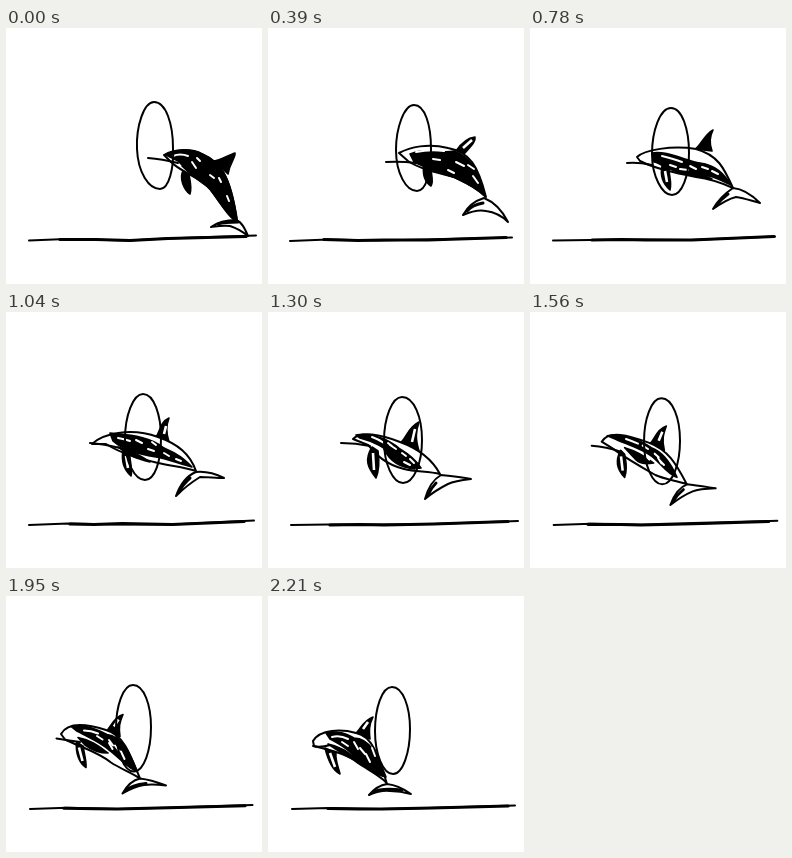
An HTML page without scripts that plays this animation: 256 by 256 pixels, repeating every 2340 ms.

```html
<!DOCTYPE html>
<html lang="en">
<head>
<meta charset="utf-8">
<title>Dolphin through a hoop</title>
<style>
html, body { margin: 0; width: 100%; height: 100%; overflow: hidden; background: #fff; }
svg { display: block; width: 100%; height: 100%; }
path {
  fill: none; stroke: #000; stroke-width: 2;
  stroke-linecap: round; stroke-linejoin: round;
  animation: swim 2340ms infinite;
}
.ink { fill: #000; stroke-width: 1.6; }
.skin { fill: #fff; }
.chalk { stroke: #fff; }

/* Seven poses, a to g; steps hold each drawing for 130 ms. */
@keyframes swim {
  0% { d: var(--a); animation-timing-function: steps(3); }
  16.6667% { d: var(--b); animation-timing-function: steps(3); }
  33.3333% { d: var(--c); animation-timing-function: steps(2); }
  44.4444% { d: var(--d); animation-timing-function: steps(2); }
  55.5556% { d: var(--e); animation-timing-function: steps(3); }
  72.2222% { d: var(--f); animation-timing-function: steps(4); }
  94.4444% { d: var(--g); animation-timing-function: steps(1); }
  100% { d: var(--g); }
}

#line {
  --a: path("M23 212.5L60 211L122 212.5L160 210.5L250 207.5");
  --b: path("M22 213L60 211.5L110 212.5L160 211.5L244 209.5");
  --c: path("M23 212.5L60 212L112 211.5L160 212L245 208.5");
  --d: path("M23 213L62 211.5L110 212.5L165 212.5L248 208.5");
  --e: path("M23 213L60 212.5L114 212.5L165 212L250 209");
  --f: path("M24 213L62 211.5L112 213L160 211.5L246 208.5");
  --g: path("M24 213L60 212L112 213L160 212L247 209.5");
}
#thick {
  stroke-width: 3.2;
  --a: path("M54 211.5L90 211.5L124 212.5L162 210.5L240 208.5");
  --b: path("M56 211.5L90 212.5L116 212L160 212L238 209.5");
  --c: path("M62 212L92 211.5L116 212L162 212L244 208.5");
  --d: path("M64 212L88 212.5L116 211.5L166 212.5L238 209.5");
  --e: path("M62 213L92 212.5L116 213L166 212L240 209.5");
  --f: path("M56 212L90 212.5L108 213L162 211.5L238 209.5");
  --g: path("M60 212.5L90 213L114 213L164 212L240 210");
}
#hoop {
  --a: path("M148 74C138 74 130 98 131 121C132 145 143 161 154 161C163 161 168 140 167 120C167 96 160 74 148 74Z");
  --b: path("M146 77C136 77 128 100 128 122C128 145 138 163 149 163C158 163 163 145 163 121C163 97 157 77 146 77Z");
  --c: path("M141 80C130 80 122 103 122 126C122 148 132 167 142 167C152 167 159 148 159 125C159 101 152 80 141 80Z");
  --d: path("M137 82C127 82 119 104 119 127C119 150 129 168 139 168C149 168 155 149 155 126C155 103 148 82 137 82Z");
  --e: path("M134 85C124 85 116 106 116 129C116 152 125 171 135 171C146 171 154 151 154 128C154 105 146 85 134 85Z");
  --f: path("M130 87C120 87 113 108 113 130C113 154 121 173 131 173C141 173 148 152 148 129C148 107 141 87 130 87Z");
  --g: path("M124 91C114 91 107 112 107 135C107 158 115 178 125 178C135 178 142 156 142 133C142 111 135 91 124 91Z");
}
#body {
  --a: path("M158 127C168 121 186 120 196 126C214 134 224 146 231 192C226 194 214 174 204 161C194 149 174 144 164 133Z");
  --b: path("M131 125C142 119 160 115 180 120C202 124 210 138 218 169C206 158 198 155 186 149C166 144 150 140 140 133Z");
  --c: path("M107 129C114 122 142 117 166 121C188 127 194 140 203 160C192 155 182 151 166 149C146 145 126 141 110 133Z");
  --d: path("M86 132C96 122 124 115 152 125C172 132 184 142 190 159C178 155 166 154 152 151C132 146 116 142 100 132Z");
  --e: path("M85 127C93 119 112 122 132 130C154 138 165 149 172 162C160 159 148 160 136 157C116 152 108 142 100 133Z");
  --f: path("M65 131C72 117 92 124 112 131C130 138 136 152 149 177C138 173 128 171 120 166C104 154 92 150 72 137Z");
  --g: path("M45 145C52 133 74 133 88 137C104 140 110 158 119 188C116 182 100 174 90 167C80 158 64 155 46 150Z");
}
#back {
  --a: path("M160 127C170 121 186 121 196 126C214 134 224 146 231 192C226 194 214 174 204 161C194 149 182 144 172 133Z");
  --b: path("M142 126C158 119 172 126 186 123C204 130 208 140 217 168C206 158 198 155 186 149C170 145 158 136 146 134Z");
  --c: path("M122 125C136 122 156 133 170 135C186 137 194 146 201 157C190 152 182 147 166 146C148 145 136 136 124 134Z");
  --d: path("M104 121C122 123 144 124 158 136C172 142 178 147 186 155C174 152 162 147 150 145C134 142 118 139 107 129Z");
  --e: path("M88 123C102 120 120 127 132 137C142 143 148 148 153 156C142 158 136 147 128 145C120 138 108 130 92 126Z");
  --f: path("M72 124C86 121 104 128 116 135C130 139 138 154 144 170C134 164 126 150 116 142C106 136 90 133 78 126Z");
  --g: path("M58 137C70 134 78 138 86 142C102 142 110 160 118 181C108 180 100 172 90 166C86 158 76 150 62 143Z");
}
#flank {
  --a: path("M176 138C190 144 204 152 212 166C204 160 190 152 176 138Z");
  --b: path("M146 134C162 136 180 140 200 153C184 149 164 143 146 134Z");
  --c: path("M126 134C146 138 164 142 182 151C166 149 146 146 126 134Z");
  --d: path("M112 135C124 138 134 143 144 150C132 147 122 144 112 135Z");
  --e: path("M116 137C126 142 138 146 147 157C134 156 122 150 116 137Z");
  --f: path("M84 135C98 138 106 145 112 148C108 150 102 154 98 150Z");
  --g: path("M60 148C72 150 80 156 92 166C84 164 72 156 60 148Z");
}
#fin {
  --a: path("M208 133C214 133 222 127 229 125C230 129 224 134 222 146Z");
  --b: path("M188 123C192 117 198 110 207 109C208 114 202 119 196 126Z");
  --c: path("M165 121C170 119 174 107 183 102C179 110 180 118 182 123Z");
  --d: path("M150 125C154 120 154 110 163 106C160 114 160 120 163 130Z");
  --e: path("M132 131C138 127 140 115 151 110C148 119 147 126 151 139Z");
  --f: path("M114 132C118 128 119 119 129 116C126 124 124 128 126 138Z");
  --g: path("M86 139C92 135 94 125 105 121C101 129 101 134 102 143Z");
}
#flipper {
  --a: path("M177 143C173 150 178 162 184 166C186 160 184 152 183 147Z");
  --b: path("M156 137C154 146 157 154 163 158C166 154 163 146 163 141Z");
  --c: path("M132 138C130 148 133 156 140 162C142 154 139 148 139 141Z");
  --d: path("M117 138C115 150 118 158 125 164C127 156 123 148 124 141Z");
  --e: path("M104 135C96 148 100 156 108 166C112 156 111 146 110 139Z");
  --f: path("M84 140C79 150 82 160 88 165C91 156 88 150 87 144Z");
  --g: path("M57 152C60 164 64 174 72 178C70 170 67 164 68 157Z");
}
#tail {
  --a: path("M205 199C212 194 220 192 230 192C236 194 239 201 242 208C236 203 230 200 224 198C218 197 212 198 205 199Z");
  --b: path("M195 187C200 178 206 173 216 170C226 174 234 182 240 194C234 188 226 184 218 183C210 181 202 184 195 187Z");
  --c: path("M183 181C188 172 194 166 203 160C214 161 222 167 230 175C222 173 214 170 206 169C198 171 190 176 183 181Z");
  --d: path("M170 184C174 173 180 164 190 160C200 159 210 162 218 166C210 166 202 165 194 165C186 170 178 176 170 184Z");
  --e: path("M157 187C160 176 166 167 173 163C184 164 194 165 203 167C194 168 186 169 180 172C172 176 164 181 157 187Z");
  --f: path("M132 196C136 186 142 179 149 177C158 178 168 180 177 181C168 181 160 181 154 183C146 186 140 190 132 196Z");
  --g: path("M101 199C106 193 112 189 119 188C128 189 136 193 143 198C136 196 130 195 122 195C114 194 108 196 101 199Z");
}
#lobe {
  stroke-width: 3;
  --a: path("M212 196Q218 194 232 194");
  --b: path("M199 183Q204 177 215 175");
  --c: path("M186 178Q191 171 198 166");
  --d: path("M173 180Q177 172 184 166");
  --e: path("M160 183Q163 176 168 171");
  --f: path("M134 193Q139 186 146 181");
  --g: path("M106 196Q112 192 134 194");
}
#beak {
  --a: path("M142 130Q156 131 172 135");
  --b: path("M118 134Q132 133 148 135");
  --c: path("M97 135Q108 134 122 137");
  --d: path("M84 131Q98 132 114 136");
  --e: path("M73 131Q88 131 102 134");
  --f: path("M56 135Q70 136 86 143");
  --g: path("M45 150Q52 152 62 149");
}
/* White scratches on the dark skin */
#specks {
  --a: path("M167 128Q174 125 182 128M186 134L190 140M191 130L194 133M204 147L208 150M213 150L215 154M221 168L223 173");
  --b: path("M148 124Q162 121 176 123M165 131L172 132M188 134L196 138M200 137L206 141M205 148L210 155M180 142L186 145");
  --c: path("M132 128Q144 131 152 134M150 141L158 142M160 138L166 141M172 139L178 141M182 143L188 146M140 137L146 139");
  --d: path("M112 126Q118 127 124 129M130 128L136 131M142 137L148 139M146 130L150 133M158 141L163 144M170 147L175 149");
  --e: path("M104 125Q110 127 116 131M122 133L128 137M134 141L138 144M136 150L142 153M120 131L124 134M142 147L146 151");
  --f: path("M92 128Q98 130 104 132M108 134L113 137M120 142L124 146M126 147L130 153M132 153L135 160M102 142L106 146");
  --g: path("M64 141Q72 139 80 143M74 146L80 150M86 146L90 153M92 152L97 158M98 158L102 166M104 152L107 160");
}
/* Open centres of the fin and flipper */
#glint {
  stroke-linecap: butt; stroke-width: 2.6;
  --a: path("M220 133L220 133M181 150L181 150");
  --b: path("M195 120L204 112M160 148L160 148");
  --c: path("M176 114L176 114M135 143L137 154");
  --d: path("M158 122L160 114M120 144L122 156");
  --e: path("M144 130L147 117M105 141L106 158");
  --f: path("M121 128L125 121M84 146L86 159");
  --g: path("M95 133L100 126M62 157L67 171");
}
</style>
</head>
<body>
<svg viewBox="0 0 256 256" role="img" aria-label="A dolphin leaps through a hoop">
  <path id="line"/>
  <path id="thick"/>
  <path id="tail" class="skin"/>
  <path id="lobe"/>
  <path id="fin" class="ink"/>
  <path id="body" class="skin"/>
  <path id="back" class="ink"/>
  <path id="flank" class="ink"/>
  <path id="flipper" class="ink"/>
  <path id="specks" class="chalk"/>
  <path id="glint" class="chalk"/>
  <path id="beak"/>
  <path id="hoop"/>
</svg>
</body>
</html>
```
